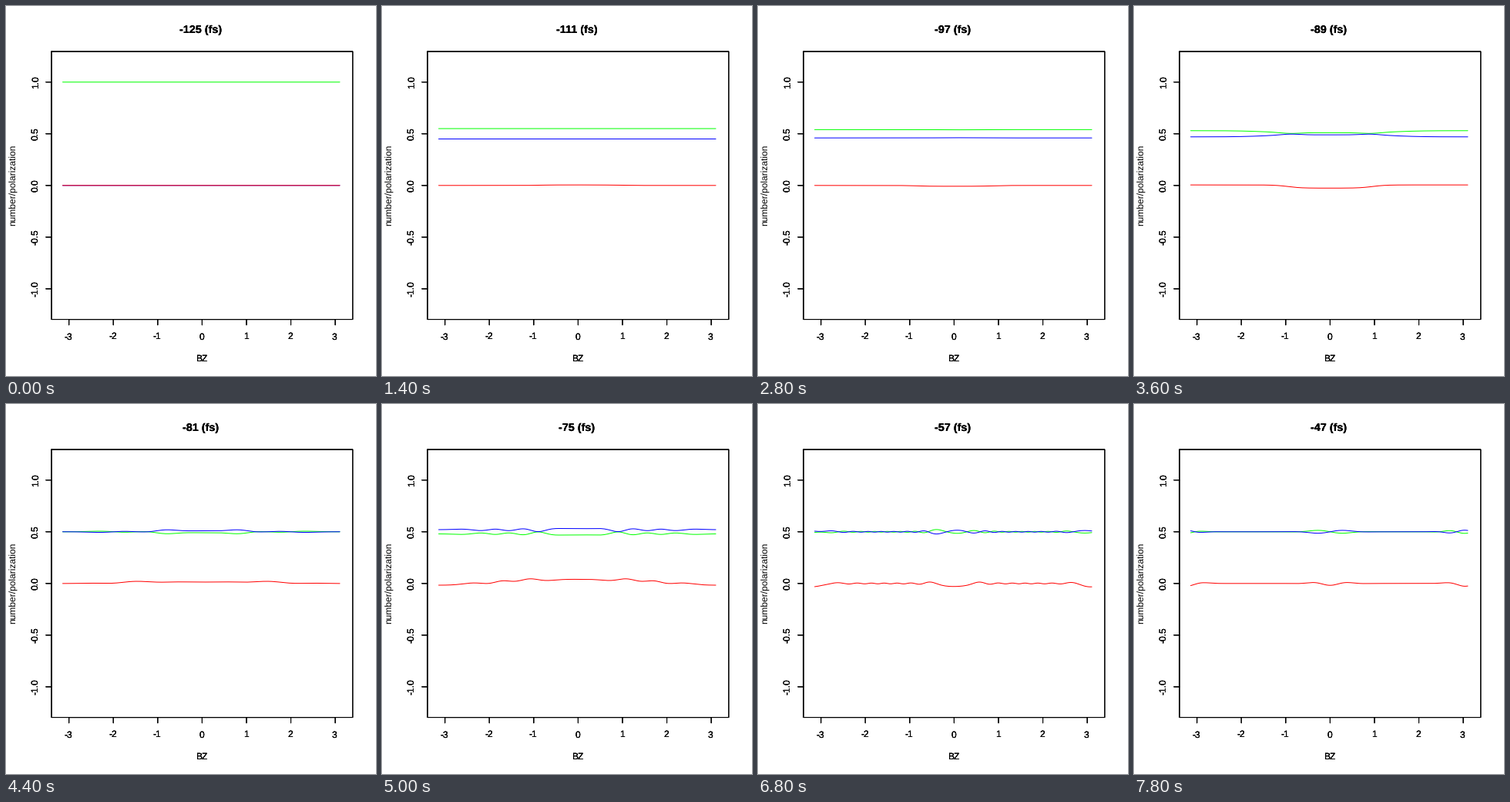
These frames come from a looping animation (480 px wide and 480 px high, 8 s). A matplotlib script:

```python
import numpy as np
import matplotlib.pyplot as plt
from matplotlib.animation import FuncAnimation

plt.rcParams["font.family"] = "Liberation Sans"
plt.rcParams["text.hinting"] = "none"

SIZE, DPI = 480, 72              # at 72 dpi one point is one pixel
LEFT, RIGHT, TOP, BOTTOM = 59.04, 449.76, 59.04, 406.56
MID = (LEFT + RIGHT) / 2
LINE = 14.4                      # height of one margin line
PASSES = 3                       # the three plots are laid over each other
FRAMES, STEP_MS = 40, 200
START, STEP_FS = -125, 2

# Times in fs at which the motion changes character
DRIVE, KICK, SHIFT, RING, END = -97, -89, -75, -65, -47

fig = plt.figure(figsize=(SIZE / DPI, SIZE / DPI), dpi=DPI, facecolor="white")
ax = fig.add_axes([0, 0, 1, 1])
ax.set_xlim(0, SIZE)
ax.set_ylim(SIZE, 0)
ax.axis("off")


def px(x):
    return MID + x * (RIGHT - LEFT) / (2 * 1.08 * np.pi)


def py(y):
    return (TOP + BOTTOM) / 2 - y * (BOTTOM - TOP) / (2 * 1.08 * 1.2)


def stroke(xs, ys, color="black"):
    return ax.plot(xs, ys, color=color, lw=1, snap=False,
                   solid_capstyle="round", solid_joinstyle="round")[0]


def label(x, y, s, size=12, **kw):
    return ax.text(x, y, s, fontsize=size, ha="center", va="baseline",
                   rotation_mode="anchor", **kw)


def draw_frame():
    stroke([LEFT, RIGHT, RIGHT, LEFT, LEFT], [TOP, TOP, BOTTOM, BOTTOM, TOP])
    stroke(px(np.array([-3, 3])), [BOTTOM, BOTTOM])
    stroke([LEFT, LEFT], py(np.array([-1, 1])))
    for v in range(-3, 4):
        stroke([px(v)] * 2, [BOTTOM, BOTTOM + LINE / 2])
        label(px(v) - 0.8, BOTTOM + 1.8 * LINE, str(v))
    for v in np.arange(-2, 3) / 2:
        stroke([LEFT, LEFT - LINE / 2], [py(v)] * 2)
        label(LEFT - 1.2 * LINE, py(v), f"{v:.1f}", rotation=90)
    label(MID - 0.8, BOTTOM + 3.8 * LINE, "BZ")


for _ in range(PASSES):
    draw_frame()
label(LEFT - 3.2 * LINE, py(0), "number/polarization", rotation=90)
titles = [label(MID - 2, 34.7, "", LINE, weight="bold") for _ in range(PASSES)]

k = np.arange(-80, 80) * np.pi / 80


def bell(x, w):
    return np.exp(-(x / w) ** 2)


def well(edge, w):
    return 1 / (1 + np.exp((np.abs(k) - edge) / w))


def wrap(x):
    return (x + np.pi) % (2 * np.pi) - np.pi


def ramp(t, a, b):
    return np.clip((t - a) / (b - a), 0, 1)


def tent(t, a, b, c):
    """Rise from a to b, fall from b to c."""
    return ramp(t, a, b) * (1 - ramp(t, b, c))


def relax(t):
    """Decay of the full band to its resting split, first faint response."""
    on = ramp(t, -111, DRIVE)
    d = -.04 - .46 * np.exp((START - t) / 3.66) + .002 * on * bell(k, .5)
    r = .005 * (1 - 2.6 * on) * ramp(t, START, -111) * well(.85, .15)
    return d + 1j * r


def kick():
    d = -.03 + .02 * well(1.5, .3) + .009 * bell(np.abs(k) - .9, .3)
    return d + 1j * (.005 - .031 * well(.95, .15))


def shifted(u):
    d = .0185 + .006 * bell(u, .4)
    r = .012 + .022 * np.cos(u) + .014 * bell(u - 1.2, .8)
    return d + 1j * r


def ripple(t, u, shift):
    """Ringing whose phase follows the cosine band and grows with time."""
    ring = tent(t, SHIFT, RING, END)
    amp = .007 * ramp(t, KICK, SHIFT) + .004 * ramp(t, SHIFT, RING)
    amp = amp * (1 - ramp(t, RING, -53))
    amp = amp + ring * (.039 * bell(u, .6) + .019 * bell(np.pi - u, .55))
    phase = (.64 * (t + 91.7) * (1 - np.cos(u)) + .04 * np.pi * (t - RING)
             + .6 * shift * bell(u, 1))
    near = shift * bell(u - .8, .4)
    d = (amp + .011 * near) * np.cos(phase)
    r = -(amp + .003 * near) * np.sin(phase)
    return d + 1j * (r - .014 * ring * bell(np.pi - u, .4))


def remnant():
    """Packets left at the centre and at the zone edge."""
    v = wrap(k - np.pi) + .1
    d = (.018 * np.sin(4.5 * k) * bell(k, .6)
         - .016 * np.cos(8 * (v + .39)) * bell(v + .1, .45))
    r = (-.018 * np.cos(7 * k) * bell(k, .5)
         - .027 * np.cos(6 * v) * bell(v, .4))
    return d + 1j * r


def state(t):
    """Offset of the numbers from one half (real), polarization (imaginary)."""
    k0 = .1 * ramp(t, SHIFT, RING) - .2 * ramp(t, RING, END)
    u = np.abs(wrap(k - k0))
    shift = tent(t, KICK, SHIFT, -69)
    return ((1 - ramp(t, DRIVE, KICK)) * relax(t)
            + tent(t, DRIVE, KICK, SHIFT) * kick()
            + shift * shifted(u)
            + ripple(t, u, shift)
            + ramp(t, RING, END) * remnant())


green, blue, red = (stroke(px(k), py(0 * k), c)
                    for c in ("#00ff00", "#0000ff", "#ff0000"))


def update(i):
    t = START + STEP_FS * i
    s = state(t)
    green.set_ydata(py(.5 - s.real))
    blue.set_ydata(py(.5 + s.real))
    red.set_ydata(py(s.imag))
    for title in titles:
        title.set_text(f"{t} (fs)")
    return [green, blue, red, *titles]


anim = FuncAnimation(fig, update, frames=FRAMES, interval=STEP_MS,
                     init_func=lambda: update(0), repeat=True,
                     repeat_delay=0, blit=False)
plt.show()
```
